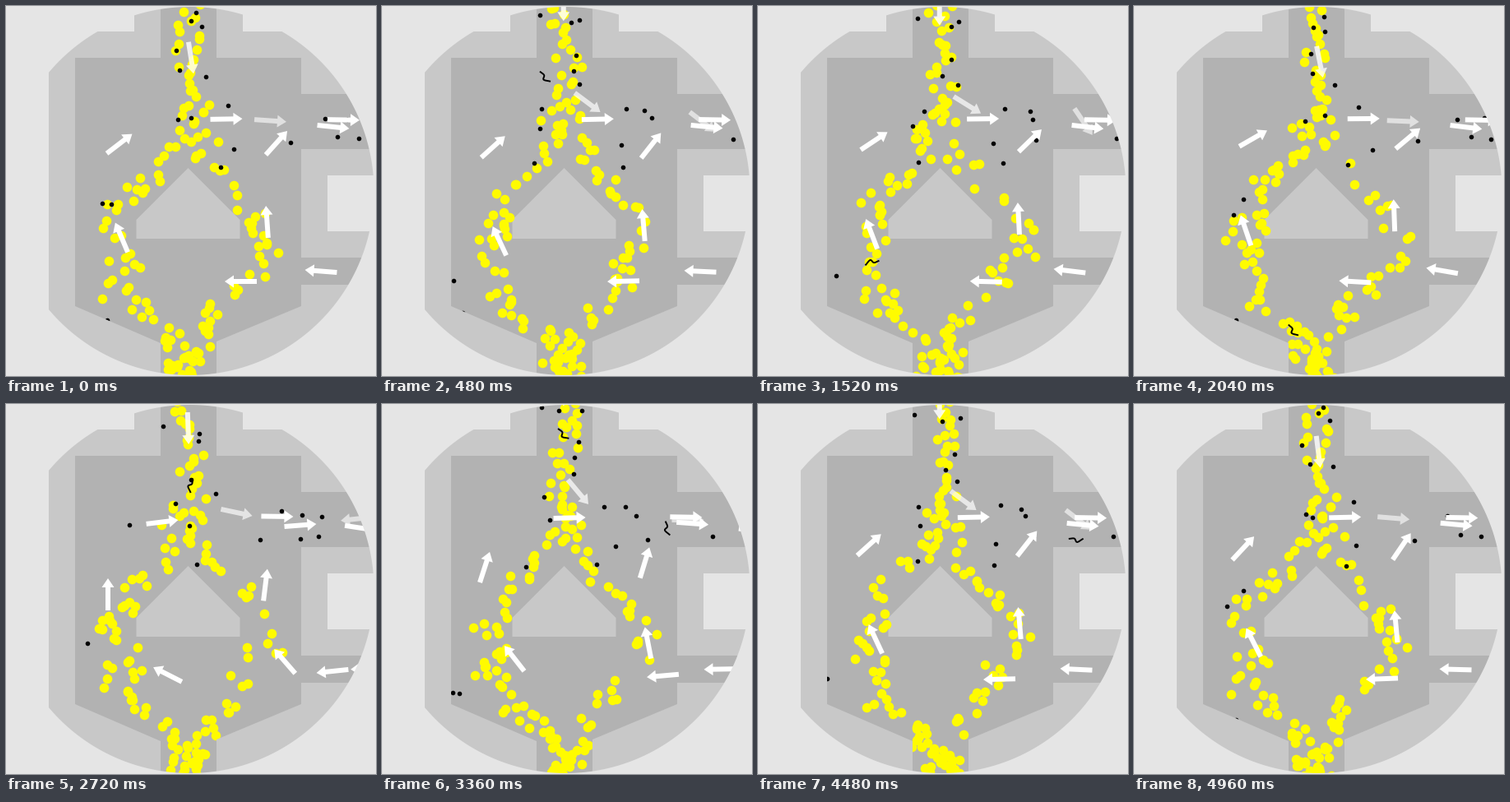
Recreate the animation shown at these times as a matplotlib script. Size 450 by 450 pixels, loop 5 s.

```python
import math
import numpy as np
import matplotlib.pyplot as plt
from matplotlib.animation import FuncAnimation
from matplotlib.patches import Circle, PathPatch, Polygon, Rectangle
from matplotlib.path import Path

SIZE, FRAMES, STEP = 450, 125, 40
PAGE, WALL, INSIDE = "#e5e5e5", "#c8c8c8", "#b2b2b2"
YELLOW = "#fffb00"
rng = np.random.default_rng(14)

fig = plt.figure(figsize=(4.5, 4.5), dpi=100, facecolor=PAGE)
ax = fig.add_axes([0, 0, 1, 1])
ax.set_xlim(0, SIZE)
ax.set_ylim(SIZE, 0)
ax.axis("off")


class Track:
    """Smooth curve through rows of (time, value, value, ...)."""

    def __init__(self, rows):
        rows = np.array(rows, float)
        self.t, self.v = rows[:, 0], rows[:, 1:]
        self.slope = np.gradient(self.v, self.t, axis=0)

    def at(self, t):
        t = min(max(t, self.t[0]), self.t[-1])
        i = min(np.searchsorted(self.t, t, "right") - 1, len(self.t) - 2)
        h = self.t[i + 1] - self.t[i]
        u = (t - self.t[i]) / h
        a, b = self.v[i], self.v[i + 1]
        m, n = self.slope[i] * h, self.slope[i + 1] * h
        return (a + u * m + u * u * (3 * (b - a) - 2 * m - n)
                + u ** 3 * (2 * (a - b) + m + n))

    def count(self, period):
        return math.ceil((self.t[-1] - self.t[0]) / period)

    def ages(self, frame, period):
        first = self.t[0] + (frame - self.t[0]) % period
        return [first + k * period for k in range(self.count(period))]


def place(shape, x, y, angle):
    a = math.radians(angle)
    c, s = math.cos(a), math.sin(a)
    return shape @ np.array([[c, s], [-s, c]]) + (x, y)


# --- housing -------------------------------------------------------------
INNER = [(188, -5), (256, -5), (256, 63), (359, 63), (359, 107), (455, 107),
         (455, 174), (359, 174), (359, 306), (455, 306), (455, 339),
         (359, 339), (359, 365), (256, 408), (256, 455), (188, 455),
         (188, 410), (84, 365), (84, 63), (188, 63)]
FRAME = [(-10, -10), (-10, 460), (460, 460), (460, -10)]
CONE = [(221.5, 197), (284.5, 260), (284.5, 283), (158.5, 283), (158.5, 260)]


def closed(points):
    codes = [Path.MOVETO] + [Path.LINETO] * (len(points) - 1) + [Path.CLOSEPOLY]
    return Path(list(points) + [points[0]], codes)


def plate(hole, color, z):
    path = Path.make_compound_path(closed(FRAME), closed(hole))
    ax.add_patch(PathPatch(path, fc=color, lw=0, zorder=z))


def box(x0, y0, x1, y1, color, z):
    ax.add_patch(Rectangle((x0, y0), x1 - x0, y1 - y0, fc=color, lw=0, zorder=z))


box(-5, -5, 455, 455, INSIDE, 0)
ax.add_patch(Polygon(CONE, fc=WALL, lw=0, zorder=1))
plate(INNER, WALL, 4)
box(-5, -5, 52, 455, PAGE, 5)
box(-5, -5, 155.5, 31, PAGE, 5)
box(288, -5, 455, 31, PAGE, 5)
box(391, 206, 455, 274, PAGE, 5)

turn = np.linspace(0, 2 * np.pi, 240, endpoint=False)
ring = [(223.5 + 224 * math.cos(a), 225 + 224 * math.sin(a)) for a in turn]
plate(ring, PAGE, 9)

# --- grains --------------------------------------------------------------
GRAINS = 138
LIFE = np.array([0, 22, 57, 95, 118, 140]) / 140
FALL = [-7, 120, 240, 360, 420, 456]
LEVEL = [-8, 100, 165, 200, 230, 280, 330, 360, 400, 455]
LEFT = [222, 220, 205, 180, 145, 132, 140, 142, 200, 222]
RIGHT = [222, 228, 238, 254, 292, 324, 298, 268, 240, 222]
SPREAD = [20, 18, 20, 22, 20, 28, 28, 28, 16, 28]

birth = (np.arange(GRAINS) + rng.uniform(-0.8, 0.8, GRAINS)) / GRAINS
goes_left = rng.random(GRAINS) < 0.58
side = rng.uniform(-0.85, 0.85, GRAINS)
sway = rng.uniform(0, 2 * np.pi, GRAINS)


def grain_points(frame):
    s = (frame / FRAMES + birth) % 1
    y = np.interp(s, LIFE, FALL)
    mid = np.where(goes_left, np.interp(y, LEVEL, LEFT), np.interp(y, LEVEL, RIGHT))
    reach = side + 0.2 * np.sin(8 * np.pi * s + sway)
    return np.column_stack([mid + np.interp(y, LEVEL, SPREAD) * reach, y])


def disc_area(radius):
    return (2 * radius * 0.72) ** 2


grains = ax.scatter([], [], s=disc_area(5.8), c=YELLOW, lw=0, zorder=2)

# --- dust: time, x, y ----------------------------------------------------
DUST_PERIOD = 25
LAPS = FRAMES // DUST_PERIOD
UPPER = [(-5, 224, -15), (0, 233, 8), (18, 228, 91), (25, 207, 137),
         (34, 273, 124), (50, 387, 137), (59, 455, 137)]
AROUND = [(-5, 215, -8), (0, 224, 17), (9, 206, 142), (18, 156, 148),
          (25, 123, 241), (34, 92, 352), (50, 125, 383), (59, 92, 352),
          (75, 123, 241), (84, 174, 197), (100, 259, 196), (109, 279, 173),
          (125, 345, 165), (141, 455, 160)]
MIDDLE = [(-20, 208, -8), (-7, 235, 45), (0, 215, 77), (18, 219, 147),
          (25, 281, 174), (34, 319, 164), (54, 460, 161)]
SHALLOW = [(-20, 195, -5), (-7, 194, 28), (9, 236, 86), (25, 270, 122),
           (34, 307, 135), (50, 455, 138)]
DEEP = [(-20, 249, -8), (0, 240, 85), (9, 263, 196), (18, 355, 164),
        (34, 460, 161)]
late = [(t - 4, x, y) for t, x, y in UPPER]
DUST = [Track(rows) for rows in (UPPER, late, AROUND, MIDDLE, SHALLOW, DEEP)]
drift = rng.uniform(-1, 1, (len(DUST), LAPS, 2)) * (6, 1)
dust = ax.scatter([], [], s=disc_area(2.8), c="black", lw=0, zorder=3)


def dust_points(frame):
    points = []
    for track, shifts in zip(DUST, drift):
        for age in track.ages(frame, DUST_PERIOD):
            lap = round((frame - age) / DUST_PERIOD) % LAPS
            points.append(track.at(age) + shifts[lap])
    return points


# --- fibres: time, x, y, angle -------------------------------------------
CURL = Track([(0, -8, -3), (1, -2, -3), (2, 1, 1.5), (3, 8, -2)])
CURL_SHAPE = np.array([CURL.at(t) for t in np.linspace(0, 3, 19)])
FIBRES = [
    Track([(0, 218, -15, 20), (25, 171, 199, 80), (38, 138, 310, 160),
           (51, 192, 396, 45), (60, 222, 465, 90)]),
    Track([(55, 215, -12, 10), (68, 223, 99, 95), (84, 345, 152, 70),
           (95, 465, 150, 0)]),
    Track([(78, 215, -12, 90), (84, 219, 38, 40), (100, 270, 172, 0),
           (119, 465, 150, 0)]),
]
fibres = [ax.plot([], [], color="black", lw=1.4, zorder=3)[0] for _ in FIBRES]

# --- air arrows: time, x, y, heading -------------------------------------
ARROW = np.array([(-19.5, -3), (8.5, -3), (8.5, -7.5), (19.5, 0),
                  (8.5, 7.5), (8.5, 3), (-19.5, 3)])
FAST = Track([
    (-13, 493, 318, 174), (-7, 397, 325, 174), (-3.5, 341.5, 330.5, 175),
    (0, 285.5, 335, 180), (5.5, 196.5, 329, 207), (9, 161, 309.5, 232),
    (12.5, 140.5, 281.5, 247), (18, 124, 231.5, 270), (21.5, 125, 198.5, 288),
    (25, 138, 167.5, 322.5), (30.5, 190, 143.5, 353), (37.5, 268, 137.5, 359),
    (50, 410.5, 138.5, 361), (56, 482, 140, 361)])
SLOW = Track([
    (-12, 478, 321, 180), (-3.5, 411, 322.5, 179), (0, 383, 322.5, 184.5),
    (5.5, 339, 313, 229), (9, 323.5, 290.5, 259), (12.5, 317.5, 262.5, 266),
    (18, 315.5, 220, 277), (21.5, 319.5, 193, 287), (25, 329, 166.5, 312),
    (30.5, 358, 147.5, 355.5), (37.5, 398, 147, 366), (50, 475, 158, 369)])
FEED = Track([
    (-20, 221, -38, 90), (-7, 221.5, 29.5, 88), (0, 225, 63, 81),
    (9, 238.5, 107, 50), (18, 280.5, 132, 12), (25, 321.5, 139.5, 4),
    (34, 372, 141, 0), (50, 470, 138, 353)])


def make_arrows(track, period, z):
    return [ax.add_patch(Polygon(ARROW, fc="white", lw=0, zorder=z))
            for _ in range(track.count(period))]


STREAMS = [(track, period, make_arrows(track, period, z))
           for track, period, z in ((FEED, 25, 6), (SLOW, 12.5, 7), (FAST, 12.5, 7))]


def draw(frame):
    grains.set_offsets(grain_points(frame))
    dust.set_offsets(dust_points(frame))
    for track, line in zip(FIBRES, fibres):
        line.set_data(*place(CURL_SHAPE, *track.at(frame)).T)
    for track, period, arrows in STREAMS:
        for age, arrow in zip(track.ages(frame, period), arrows):
            arrow.set_xy(place(ARROW, *track.at(age)))
            if track is FEED:
                arrow.set_alpha(float(np.interp(age, [-7, 25], [0.85, 0.6])))
    return [grains, dust, *fibres]


anim = FuncAnimation(fig, draw, frames=FRAMES, interval=STEP,
                     repeat=True, repeat_delay=0, blit=False)
plt.show()
```
